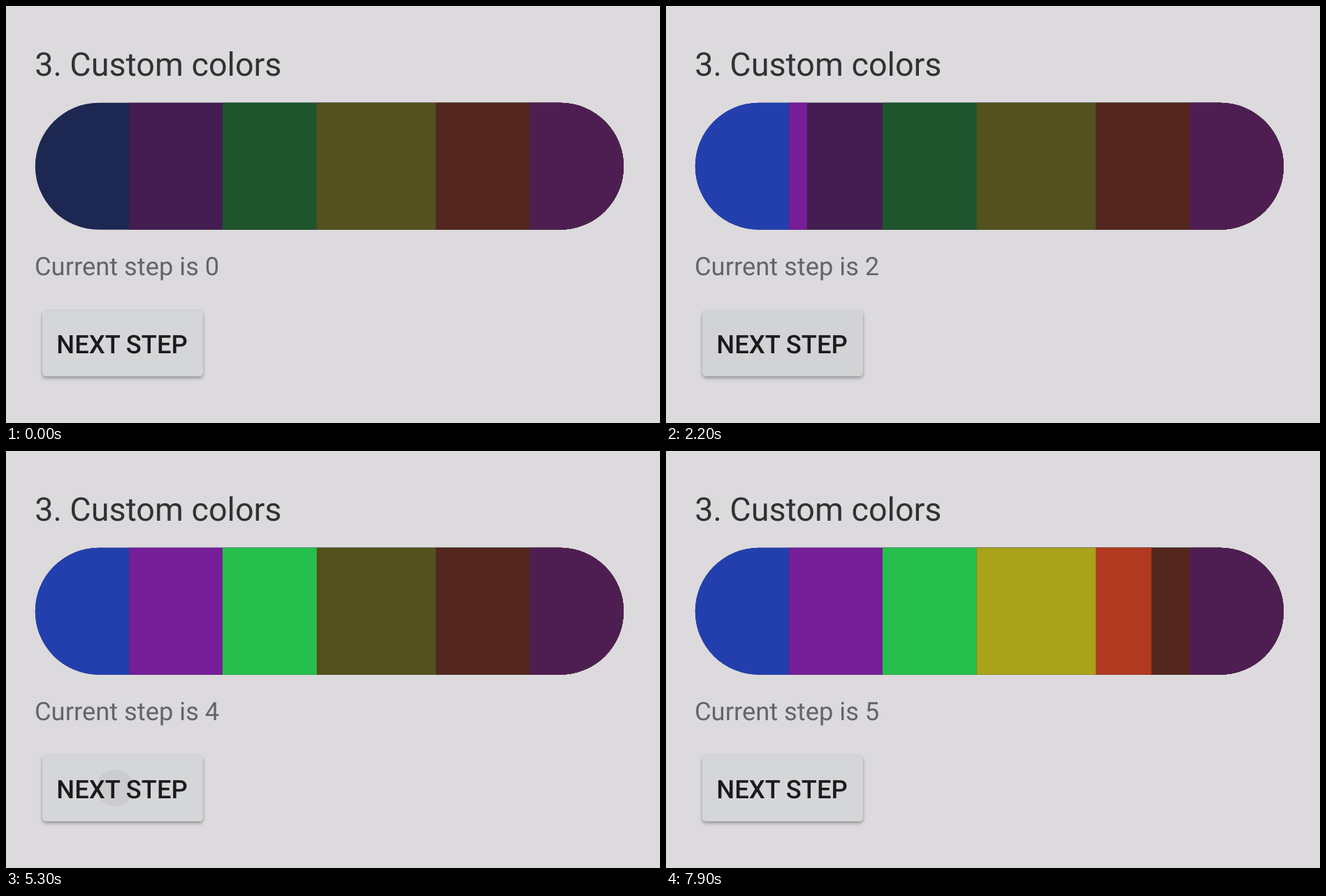
These frames come from a looping animation (936 by 598 pixels, 8000 ms). An HTML page:

```html
<!DOCTYPE html>
<html lang="en">
<head>
<meta charset="utf-8">
<title>Custom colors</title>
<style>
  html, body { margin: 0; width: 100%; height: 100%; overflow: hidden; background: #dcdadd; }
  svg { display: block; width: 936px; height: 598px; font-family: Roboto, sans-serif; text-rendering: geometricPrecision; }
  #button { filter: drop-shadow(0 3px 2.5px rgba(0, 0, 0, .27)) drop-shadow(0 0 1px rgba(0, 0, 0, .12)); }
</style>
</head>
<body>
<svg viewBox="0 0 936 598">
  <defs>
    <clipPath id="pill"><rect x="41.8" y="138.8" width="842.2" height="182" rx="91"/></clipPath>
    <clipPath id="buttonShape"><rect x="52" y="437" width="230" height="94" rx="5"/></clipPath>
  </defs>
  <text x="41.2" y="100" font-size="46.7" fill="#323133">3. Custom colors</text>
  <g id="bar" clip-path="url(#pill)"></g>
  <text id="label" x="41" y="386" font-size="36.3" fill="#656467"></text>
  <rect id="button" x="52" y="437" width="230" height="94" rx="5" fill="#d5d6d8"/>
  <g clip-path="url(#buttonShape)"><circle id="ripple" fill="#000"/></g>
  <text x="72.3" y="498" font-size="36.4" font-weight="500" fill="#1b1b1d">NEXT STEP</text>
</svg>
<script>
const LOOP = 8000;
const FILL_TIME = 1020;
const FILL_POWER = 1 / 2.4;

const segments = [
  { x: 41, end: 176.3, dim: '#1d2852', lit: '#233fae', tap: 178, touch: [157, 474] },
  { x: 176.3, end: 310, dim: '#431d52', lit: '#761e98', tap: 1795, touch: [157, 474] },
  { x: 310, end: 444.6, dim: '#1e552d', lit: '#26bf4d', tap: 3525, touch: [158.5, 465] },
  { x: 444.6, end: 615, dim: '#53511e', lit: '#a9a31b', tap: 5297, touch: [156, 483] },
  { x: 615, end: 749.5, dim: '#53271f', lit: '#b13920', tap: 6999, touch: [157, 474] },
  { x: 749.5, end: 884, dim: '#4e1e53' }
];

const byId = id => document.getElementById(id);
const clamp = v => Math.min(1, Math.max(0, v));

function addRect(x, width, fill) {
  const rect = document.createElementNS('http://www.w3.org/2000/svg', 'rect');
  const attrs = { x, y: 138, width, height: 184, fill };
  for (const name in attrs) rect.setAttribute(name, attrs[name]);
  byId('bar').append(rect);
  return rect;
}

// Each dim block runs to the right end so that no seams show.
segments.forEach(s => addRect(s.x, 885 - s.x, s.dim));
const steps = segments.filter(s => s.lit);
steps.forEach(s => { s.fill = addRect(s.x, 0, s.lit); });

// Starts slowly and speeds up sharply towards the end.
const fillEase = p => 1 - Math.pow(1 - p, FILL_POWER);

function drawRipple(step, age) {
  const ripple = byId('ripple');
  ripple.setAttribute('cx', step ? step.touch[0] : 0);
  ripple.setAttribute('cy', step ? step.touch[1] : 0);
  ripple.setAttribute('r', step ? Math.min(150, 22 + 1.1 * age) : 0);
  ripple.setAttribute('opacity', 0.047 * (1 - clamp((age - 200) / 300)));
}

function render(t) {
  for (const s of steps) {
    const p = clamp((t - s.tap) / FILL_TIME);
    s.fill.setAttribute('width', (s.end - s.x) * fillEase(p));
  }
  const count = steps.filter(s => t >= s.tap).length;
  const current = steps[count - 1];
  byId('label').textContent = 'Current step is ' + count;
  drawRipple(current, current ? t - current.tap : 0);
}

const start = performance.now();
function tick() {
  render((performance.now() - start) % LOOP);
  requestAnimationFrame(tick);
}
tick();
</script>
</body>
</html>
```
